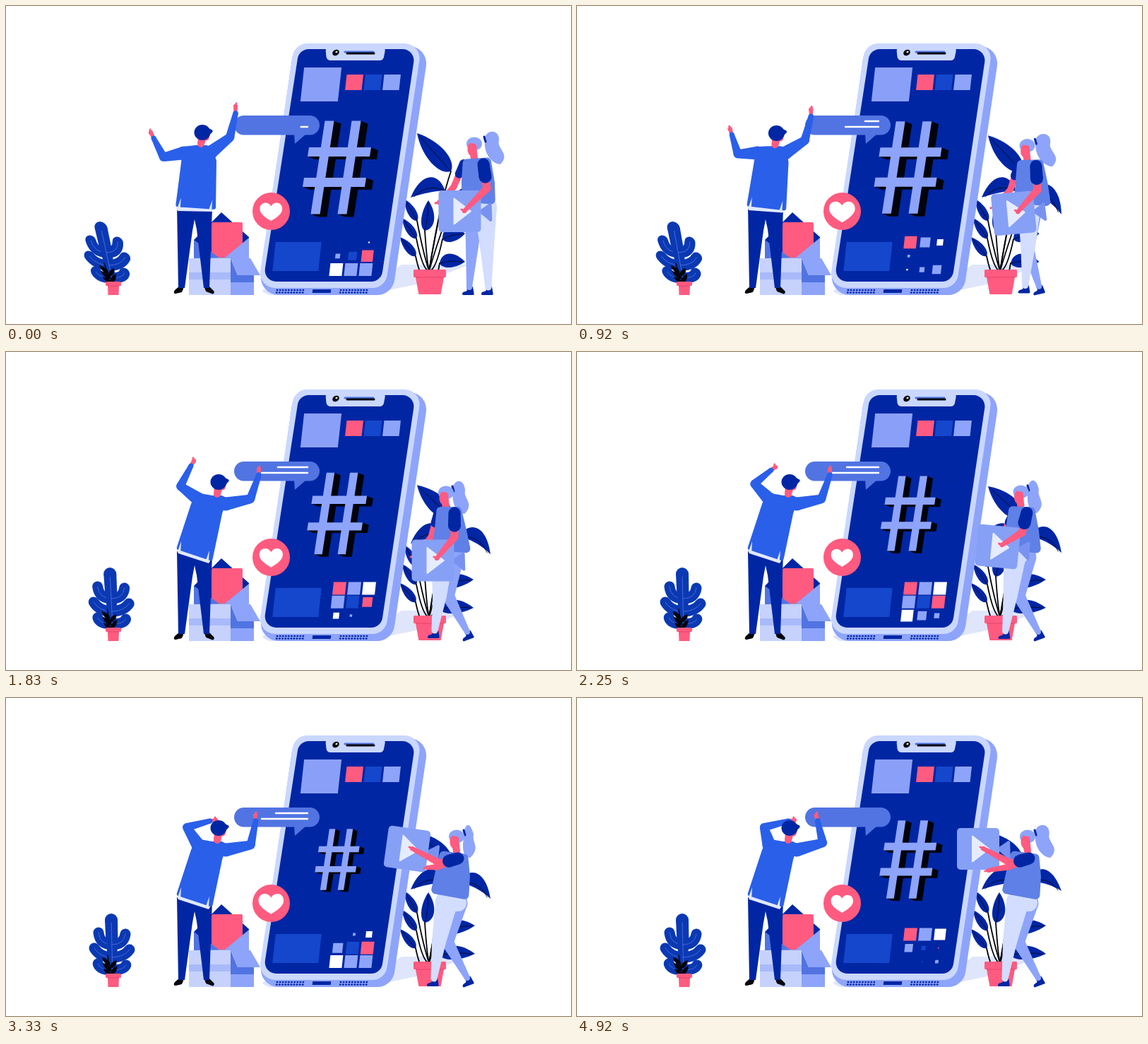
Write an HTML page with a canvas that moves like this. It is 800 px wide and 450 px high and loops after 5010 ms.

```html
<!DOCTYPE html>
<html lang="en">
<head>
<meta charset="utf-8">
<title>Hashtag scene</title>
<style>
html, body { margin: 0; width: 100%; height: 100%; overflow: hidden; background: #fff; }
canvas { display: block; width: 800px; height: 450px; }
</style>
</head>
<body>
<canvas id="stage" width="800" height="450"></canvas>
<script>
const ctx = document.getElementById('stage').getContext('2d');
const LOOP = 5010, STEP = 250 / 3;
const NAVY = '#0026a4', BLUE = '#1447cb', ROYAL = '#2a5fe9', MID = '#5174e2', SKY = '#8da4fa';
const PALE = '#d2ddff', PINK = '#ff5b80', BLACK = '#03040c', WHITE = '#fff';
let now = 0;

const clamp = u => Math.max(0, Math.min(1, u));
const smooth = u => { u = clamp(u); return u * u * (3 - 2 * u); };
const linear = (from, to) => clamp((now - from) / (to - from));
const ease = (from, to) => smooth((now - from) / (to - from));
const wave = (peak, period) => Math.cos((now - peak) / period * Math.PI * 2);
const mix = (a, b, u) => [a[0] + (b[0] - a[0]) * u, a[1] + (b[1] - a[1]) * u];
const shift = (p, dx, dy) => [p[0] + dx, p[1] + dy];

function fill(color) { ctx.fillStyle = color; ctx.fill(); }

function stroke(color, width) {
  ctx.strokeStyle = color;
  ctx.lineWidth = width;
  ctx.lineCap = ctx.lineJoin = 'round';
  ctx.stroke();
}

function placed(x, y, paint) {
  ctx.save();
  ctx.translate(x, y);
  paint();
  ctx.restore();
}

function poly(color, points, r = 0) {
  const n = points.length, start = mix(points[n - 1], points[0], 0.5);
  ctx.beginPath();
  ctx.moveTo(...start);
  points.forEach((p, i) => ctx.arcTo(...p, ...(i < n - 1 ? points[i + 1] : start), r));
  ctx.closePath();
  fill(color);
}

const box = (color, x, y, w, h, r) => poly(color, [[x, y], [x + w, y], [x + w, y + h], [x, y + h]], r);

function oval(color, x, y, rx, ry = rx, turn = 0) {
  ctx.beginPath();
  ctx.ellipse(x, y, rx, ry, turn, 0, Math.PI * 2);
  fill(color);
}

function line(color, width, points) {
  ctx.beginPath();
  points.forEach(p => ctx.lineTo(...p));
  stroke(color, width);
}

function arc(color, width, from, ctrl, to) {
  ctx.beginPath();
  ctx.moveTo(...from);
  ctx.quadraticCurveTo(...ctrl, ...to);
  stroke(color, width);
}

function limb(color, joints, widths) {
  joints.forEach((p, i) => {
    oval(color, ...p, widths[i] / 2);
    if (!i) return;
    const q = joints[i - 1], a = Math.atan2(p[1] - q[1], p[0] - q[0]);
    const nx = -Math.sin(a) / 2, ny = Math.cos(a) / 2, v = widths[i - 1], w = widths[i];
    poly(color, [shift(q, nx * v, ny * v), shift(p, nx * w, ny * w),
      shift(p, -nx * w, -ny * w), shift(q, -nx * v, -ny * v)]);
  });
}

function slanted(color, cx, cy, w, h = w) {
  const dx = h * 0.055, x = w / 2, y = h / 2;
  poly(color, [[cx - x + dx, cy - y], [cx + x + dx, cy - y], [cx + x - dx, cy + y], [cx - x - dx, cy + y]]);
}

function leaf(color, base, tip, w, bend = 0) {
  const dx = tip[0] - base[0], dy = tip[1] - base[1], len = Math.hypot(dx, dy);
  const at = (u, off) => [base[0] + dx * u - dy / len * off, base[1] + dy * u + dx / len * off];
  ctx.beginPath();
  ctx.moveTo(...base);
  ctx.bezierCurveTo(...at(0.1, bend + w), ...at(0.6, bend + w), ...tip);
  ctx.bezierCurveTo(...at(0.6, bend - w), ...at(0.1, bend - w), ...base);
  fill(color);
  arc(BLACK, 0.8, base, at(0.45, bend), mix(base, tip, 0.9));
}

function pot(cx, top, w, rim, bottom) {
  const x = w / 2;
  poly(PINK, [[cx - x + 3, top + rim], [cx + x - 3, top + rim], [cx + x * 0.68, bottom], [cx - x * 0.68, bottom]]);
  box(PINK, cx - x, top, w, rim, 1.5);
  line('#d93869', 0.7, [[cx - x + 3, top + rim], [cx + x - 3, top + rim]]);
}

function rightPlant() {
  const sway = 1 - ease(0, 2400), droop = 16 * sway - 11 * ease(3300, 5000);
  const root = [599, 375];
  const sprout = (color, base, tip, w, bend) => {
    arc(BLACK, 1.8, root, [(root[0] + base[0]) / 2, base[1] + 45], base);
    leaf(color, base, tip, w, bend);
  };
  sprout(NAVY, [630, 234], [582, 190 - 10 * sway], 17);
  sprout(NAVY, [622, 262], [573, 271], 14, 17);
  sprout(NAVY, [638, 264], [686, 284 + droop], 13, -21);
  sprout(NAVY, [593, 318], [598, 275], 12, 3);
  for (let i = 0; i < 3; i++) {
    sprout(NAVY, [582 - i, 304 + 25 * i], [564 - 3 * i, 273 + 27 * i], 8);
    if (i < 2) sprout(NAVY, [618 - 4 * i, 330 + 34 * i], [664 - 14 * sway, 322 + 40 * i], 13, -4);
  }
  pot(600, 373, 46, 11, 408);
}

function leftPlant() {
  const lean = -0.19 * (1 - ease(500, 2200)), green = '#0b39b3';
  ctx.save();
  ctx.transform(1, 0, -lean, 1, 390 * lean, 0);
  limb(green, [[149, 314], [150, 345], [151, 384]], [18, 17, 10]);
  for (let row = 0; row < 3; row++) {
    for (const side of [-1, 1]) {
      const tip = [150 + side * (19 + 6 * Math.sin(row * 1.5)), 333 + 22 * row + side];
      const root = [150, 349 + 18 * row], bend = [150 + side * 17, root[1]];
      arc(green, 15, tip, bend, root);
      arc(MID, 0.8, tip, bend, root);
    }
  }
  line(MID, 0.8, [[149, 318], [151, 390]]);
  arc(BLACK, 1.4, [144, 364], [146, 380], [151, 391]);
  for (let i = 0; i < 5; i++) {
    const side = i % 2 ? 1 : -1, y = 373 + 4 * i;
    leaf(BLACK, [147 + i, y + 5], [146 + i / 2 + side * 10, y - 6], 4);
  }
  ctx.restore();
  pot(152, 390, 22, 6, 409);
}

function phone() {
  poly(SKY, [[408, 54], [599, 57], [547, 409], [357, 409]], 25);
  poly('#cad7ff', [[408.5, 53], [589, 53], [537, 399], [356.5, 399]], 21);
  poly(NAVY, [[415, 61], [580, 61], [531, 390], [364, 390]], 16);
  poly('#cad7ff', [[452, 57], [538, 57], [534, 77], [454, 77]], 6);
  oval(BLACK, 467, 66, 5, 4, -0.5);
  oval(WHITE, 468, 65, 1.7, 1.1, -0.5);
  line(MID, 3, [[480, 65], [520, 65]]);
  line(BLACK, 3, [[483, 67], [521, 67]]);
  for (const left of [384, 474])
    for (let i = 0; i < 10; i++)
      for (const y of [402, 405.5]) oval(NAVY, left + i * 4.1 + (402 - y) * 0.2, y, 1.5, 1.2);
  slanted(NAVY, 447, 403.5, 26, 5);
  slanted('#8aa0f8', 446, 111, 53, 48);
  [PINK, BLUE, SKY].forEach((color, i) => slanted(color, 493 + 26.5 * i, 108, 23.5, 22));
  slanted(BLUE, 412, 354.5, 65, 41);
}

function tiles() {
  const colors = [PINK, SKY, WHITE, SKY, BLUE, PINK, WHITE, SKY, SKY], period = 3660, span = 1150;
  colors.forEach((color, k) => {
    const phase = (now - 454 - 233 * k + span / 2 + period) % period;
    const wrapped = (phase + period) % period, row = Math.floor(k / 3);
    const size = 18 * (smooth(wrapped / span) - smooth((wrapped - 2410) / span));
    if (size > 0.3) slanted(color, 472 - row * 2.3 + (k % 3) * 21, 334.5 + row * 19.3, size);
  });
}

function hashBars(color) {
  for (const x of [-18.5, 19.5]) poly(color, [[x, -66], [x + 13, -66], [x - 7, 66], [x - 20, 66]]);
  for (const [x, y] of [[-42, -28.5], [-49, 14.5]])
    poly(color, [[x + 1, y], [x + 89, y], [x + 87, y + 13], [x - 1, y + 13]]);
}

function hash() {
  const scale = 1 - 0.36 * (ease(600, 3700) - ease(3700, 6000));
  placed(470, 228.5, () => {
    ctx.scale(scale, scale);
    for (let i = 10; i > 0; i--) placed(i, i * 0.4, () => hashBars(BLACK));
    hashBars(SKY);
  });
}

function carton() {
  poly(NAVY, [[266, 331], [305, 292], [344, 327], [344, 358], [266, 358]]);
  box(PINK, 291, 306, 44, 52, 2);
  poly(MID, [[266, 331], [303, 357], [266, 357]]);
  poly(SKY, [[266, 357], [310, 356], [344, 328], [344, 358]]);
  box('#c6d2fc', 259, 357, 59, 52);
  box('#a9bafa', 259, 377, 59, 10);
  box(SKY, 318, 381, 33, 28);
  poly(MID, [[318, 357], [328, 381], [351, 381], [351, 391], [318, 391]]);
  poly(SKY, [[318, 357], [346, 357], [360, 381], [328, 381]]);
}

function heart() {
  const scale = 1 + 0.085 * wave(1050, 2700);
  oval(PINK, 375.5, 290.5, 26.5);
  placed(375.3, 291, () => {
    ctx.scale(scale, scale);
    ctx.beginPath();
    for (const side of [-1, 1]) {
      ctx.moveTo(0, 14);
      ctx.bezierCurveTo(9 * side, 9, 17 * side, 3, 17 * side, -4);
      ctx.bezierCurveTo(17 * side, -15, 4 * side, -16, 0, -8);
    }
    fill(WHITE);
  });
}

function bubble() {
  const shown = 1 - ease(3500, 4100);
  box(MID, 323, 155, 121, 27.5, 13.7);
  poly(MID, [[408, 181], [425, 181], [409, 195]]);
  const row = (y, w) => { if (w > 2) line(WHITE, 2.4, [[429 - w, y], [427, y]]); };
  row(163, 47 * ease(-200, 2200) * shown);
  row(171, 67 * ease(-600, 1700) * shown);
}

function hand(p, dx, dy) {
  oval(PINK, ...p, 3.1);
  line(PINK, 3, [p, shift(p, dx, dy)]);
}

function man() {
  const lean = ease(560, 1830), tuck = ease(1830, 2700), nudge = ease(4100, 5000), slide = linear(2800, 5000);
  const pose = (up, leant) => mix(up, leant, lean);
  const head = pose([279, 179.5], [302, 184.5]), neck = pose([276, 198], [299, 204]);
  const left = pose([252, 208], [272, 208]), right = pose([290, 207], [311, 215]);
  const reach = (up, leant, tucked, dx) => shift(mix(pose(up, leant), tucked, tuck), dx * nudge, 0);
  const leftElbow = reach([223, 214], [247, 190], [256, 183], 9);
  const leftWrist = reach([209, 187], [262, 161], [289, 174], 11);
  const leftHand = reach([205, 179], [266, 154], [297, 173], 11);
  const rightElbow = shift(pose([317, 186], [346, 208]), 2 * slide, -3 * nudge);
  const rightWrist = shift(pose([325, 152], [358, 174]), -18 * slide, 0);
  const rightHand = shift(pose([325, 142], [358, 166]), -20 * slide, 0);
  const hemL = pose([240, 284], [241, 279]), hemR = pose([297, 288], [292, 296]);

  poly(BLACK, [[236, 408], [239, 402], [245, 397], [252, 398], [249, 405]], 2);
  poly(BLACK, [[281, 398], [288, 397], [295, 404], [294, 408], [283, 404]], 2);
  poly(NAVY, [[242, 282], [292, 286], [288, 399], [280, 399], [270, 316], [267, 302], [264, 318], [253, 399], [244, 399]]);
  poly('#e1e8ff', [hemL, shift(hemR, -2, -2), shift(hemR, -5, 3), shift(hemL, 3, 6)]);
  poly(ROYAL, [shift(left, -2, -9), shift(neck, -7, -1), shift(neck, 7, -1), shift(right, 2, -8),
    pose([298, 219], [306, 229]), hemR, hemL, pose([248, 222], [262, 215])], 3);
  for (const u of [0.1, 0.88]) {
    const p = mix(hemL, hemR, u);
    poly('#e1e8ff', [shift(p, -3, 1), shift(p, 1, 2), shift(p, 2, -13)]);
  }

  limb(PINK, [leftWrist, leftHand], [5, 6]);
  hand(leftHand, -1, -4);
  limb(ROYAL, [left, leftElbow, leftWrist], [19, 12, 7]);
  limb(PINK, [rightWrist, rightHand], [5, 6]);
  hand(rightHand, 1, -4);
  limb(ROYAL, [right, rightElbow, rightWrist], [19, 12.5, 7.5]);
  limb(PINK, [shift(head, -1, 6), shift(neck, 0, -3)], [12, 10]);
  oval(PINK, ...shift(head, 5, 5), 4, 6);
  oval(NAVY, ...shift(head, -1, -0.5), 11.5, 11);
  poly(NAVY, [shift(head, -4, -11), shift(head, 9, -6), shift(head, 15, -3), shift(head, 8, 4), shift(head, -5, 8)], 2);
}

function shoe(ankle, tilt) {
  placed(...ankle, () => {
    ctx.rotate(tilt);
    poly(NAVY, [[-4, -1], [5, -1], [7, 11], [-11, 11], [-9, 7], [-3, 5]], 1.5);
  });
}

function card(center, turn) {
  placed(...center, () => {
    ctx.rotate(turn);
    poly('#7892f0', [[26, 0], [45, -13], [46, 17]], 2);
    box('#86a0f6', -30, -29.5, 60, 59, 5);
    poly('#e6ecff', [[-9, -20], [-9, 20], [17, 0]], 1);
  });
}

function ponytail(band) {
  const x = 16 + 8 * wave(600, 5000), y = 41;
  placed(...band, () => {
    ctx.beginPath();
    ctx.moveTo(-1, 0);
    ctx.bezierCurveTo(3, -15, x, -13, x * 0.5 + 9, 3);
    ctx.bezierCurveTo(x * 0.5 + 6, 14, x + 15, 22, x, y - 5);
    ctx.bezierCurveTo(x - 10, y - 5, x * 0.2 - 6, 22, 0, 4);
    fill(SKY);
    line(NAVY, 3, [[-1, -3], [1, 4]]);
  });
}

function woman() {
  const walk = ease(0, 1550), lift = ease(1900, 3000), turn = ease(1900, 2750);
  const body = (start, walked, turned) => mix(mix(start, walked, walk), turned, turn);
  const reach = (start, walked, lifted) => mix(mix(start, walked, walk), lifted, lift);
  const head = body([661, 201], [621, 205], [636, 202]), band = body([678, 188], [633, 193], [649, 190]);
  const shoulder = body([676, 224], [635, 228], [640, 227]), farShoulder = body([648, 223], [612, 226], [628, 232]);
  const elbow = reach([681, 258], [635, 262], [615, 234]), palm = reach([649, 290], [610, 292], [575, 213]);
  const farElbow = reach([634, 256], [602, 262], [611, 239]);
  const farPalm = shift(reach([613, 278], [578, 289], [597, 240]), -14 * ease(3300, 4200), 4 * ease(4200, 5000));
  const nearHip = body([679, 285], [618, 287], [624, 288]), farHip = body([663, 285], [635, 290], [640, 290]);
  const nearAnkle = body([683, 398], [607, 394], [606, 397]), farAnkle = body([656, 398], [653, 396], [653, 396]);

  shoe(farAnkle, -0.35 * walk);
  limb(SKY, [farHip, body([660, 340], [626, 345], [625, 345]), farAnkle], [27, 18, 8]);
  shoe(nearAnkle, 0);
  limb(PALE, [nearHip, body([681, 340], [614, 345], [613, 345]), nearAnkle], [32, 20, 9]);
  limb(PALE, [nearHip, mix(nearHip, farHip, turn)], [30, 24]);

  const farArm = () => {
    limb(PINK, [farShoulder, farElbow, farPalm], [10, 9, 6]);
    hand(farPalm, -5, 1);
    if (lift < 0.5) limb(NAVY, [farShoulder, mix(farShoulder, farElbow, 0.45)], [12, 12]);
  };
  if (lift < 0.5) farArm();

  ponytail(band);
  limb(PINK, [head, shift(head, 2, 15)], [11, 10]);
  poly('#5f80e6', [body([647, 217], [610, 219], [615, 216]), body([686, 214], [644, 219], [654, 221]),
    body([692, 250], [652, 252], [657, 252]), body([693, 281], [659, 285], [655, 286]),
    body([645, 277], [603, 280], [601, 276]), body([645, 247], [607, 250], [608, 245])], 6);
  oval(SKY, ...shift(head, 2, -6), 11, 9.5);
  oval(PINK, ...shift(head, -1, 1), 6.5, 10, 0.1);
  poly(SKY, [shift(head, -9, -8), shift(head, -2, -15), shift(head, 10, -13), shift(head, 11, -2), shift(head, 4, -6)], 3);

  card(reach([642.5, 290.5], [604.5, 295], [568, 213.5]),
    0.22 * Math.sin(Math.PI * linear(2000, 3700)) - 0.1 * Math.sin(Math.PI * walk));
  if (lift >= 0.5) farArm();
  limb(PINK, [shoulder, elbow, palm], [12, 11, 6]);
  hand(palm, -4, -2);
  limb(NAVY, [shoulder, mix(shoulder, elbow, 0.52)], [17, 18]);
}

function draw() {
  ctx.fillStyle = WHITE;
  ctx.fillRect(0, 0, 800, 450);
  poly('#dfe5fb', [[500, 409], [560, 366], [655, 366], [590, 392], [542, 402]]);
  poly('#dfe5fb', [[359, 402], [400, 396], [430, 409], [372, 409]], 2);
  [rightPlant, phone, tiles, hash, leftPlant, carton, heart, bubble, man, woman].forEach(paint => paint());
}

function tick(time) {
  now = Math.min(59, Math.floor((time % LOOP + 4) / STEP)) * STEP;
  draw();
  requestAnimationFrame(tick);
}
requestAnimationFrame(tick);
</script>
</body>
</html>
```
